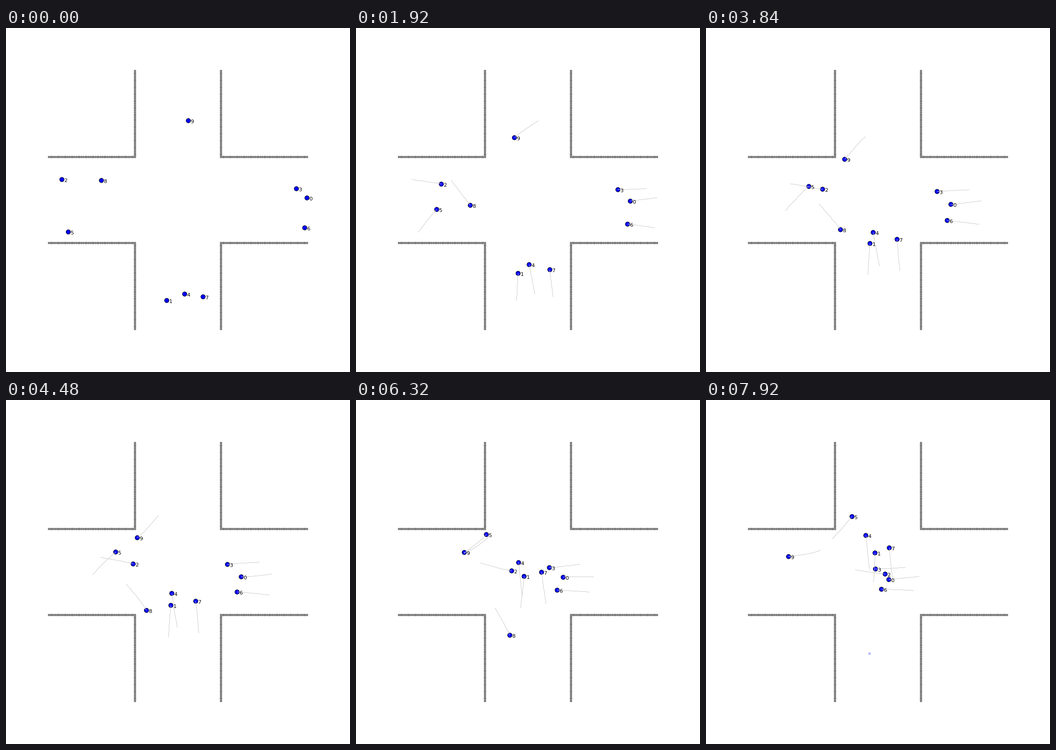
Write a matplotlib script that moves like this. It is 748 by 748 pixels and loops after 8 s.

```python
import numpy as np
import matplotlib.pyplot as plt
from matplotlib.animation import FuncAnimation
from matplotlib.collections import PolyCollection

SIZE, DPI = 748, 100
PX = 72 / DPI                # one pixel in points
FRAMES, INTERVAL = 100, 80
TRAIL = 25                   # steps kept in a trail
UNIT = SIZE / 20             # pixels per world unit
GOAL = np.array([355, 551])
FINISHER = 8                 # the walker that reaches its goal

# Each walker's route: its start, three points on the way and its end, evenly timed.
ROUTES = [
    [(654, 369), (593.5, 376.5), (527, 384), (461, 384.5), (394.5, 390.5)],
    [(349.5, 592), (352.5, 531), (357, 463), (364.5, 394), (368, 330)],
    [(121.5, 329.5), (188.5, 339.5), (259.5, 352), (327.5, 369.5), (392, 379)],
    [(631.5, 349.5), (567, 352), (497.5, 356), (431, 364), (365.5, 368)],
    [(388.5, 578), (376, 512), (363, 438.5), (355, 365.5), (347.5, 292)],
    [(135.5, 443.5), (177, 392), (227, 341), (276, 300), (319, 252)],
    [(649, 434), (588, 426), (519, 418.5), (449, 414), (379, 411)],
    [(428.5, 584), (421, 522.5), (414.5, 454), (405, 385.5), (398.5, 319)],
    [(207, 331.5), (250.5, 387.5), (296, 443), (330, 502.5), (357, 559.5)],
    [(396, 201.5), (342.5, 240), (297.5, 289), (246, 327.5), (177, 341.5)],
]


def glide(route):
    """Whole-pixel position per frame on a smooth curve through the route."""
    p = np.array(route, float)
    slope = np.gradient(p, axis=0)
    t = np.arange(FRAMES) / FRAMES * (len(p) - 1)
    i = t.astype(int)
    s = (t - i)[:, None]
    curve = ((1 + 2 * s) * (1 - s) ** 2 * p[i] + s * (1 - s) ** 2 * slope[i]
             + s ** 2 * (3 - 2 * s) * p[i + 1] - s ** 2 * (1 - s) * slope[i + 1])
    return np.floor(curve)


paths = [glide(route) for route in ROUTES]
arrival = np.argmax(np.hypot(*(paths[FINISHER] - GOAL).T) < 3)

fig = plt.figure(figsize=(SIZE / DPI, SIZE / DPI), dpi=DPI, facecolor="white")
ax = fig.add_axes([0, 0, 1, 1])
ax.set_xlim(-0.5, SIZE - 0.5)
ax.set_ylim(SIZE - 0.5, -0.5)
ax.axis("off")


def draw_walls():
    steps = np.arange(51) * 0.1
    centres = []
    for edge in (7.5, 12.5):
        for start in (2.5, 12.5):
            for step in steps:
                centres += [(start + step, edge), (edge, start + step)]
    centres = np.floor(np.array(centres) * UNIT + 1e-6)
    diamond = 2.5 * np.array([(1, 0), (0, 1), (-1, 0), (0, -1)])
    walls = PolyCollection(centres[:, None] + diamond, facecolor="#808080",
                           linewidth=0, antialiased=False, zorder=1)
    walls.set_snap(False)
    ax.add_collection(walls)


draw_walls()
dots, trails, labels = [], [], []
for number in range(len(paths)):
    dots.append(ax.add_patch(plt.Circle((0, 0), 4.8, facecolor="#0000ff",
                                        edgecolor="black", lw=0.9 * PX, zorder=2)))
    trails += ax.plot([], [], color="#c8c8c8", lw=0.9 * PX, zorder=3)
    labels.append(ax.text(0, 0, str(number), family="DejaVu Sans",
                          size=11 * PX, color="black", va="baseline", zorder=4))

gx, gy = GOAL
goal, = ax.plot([gx - 2, gx + 2, np.nan, gx - 2, gx + 2],
                [gy - 2, gy + 2, np.nan, gy + 2, gy - 2],
                color="#7878ff", lw=1 * PX, zorder=2)


def update(frame):
    for number, path in enumerate(paths):
        x, y = path[frame]
        dots[number].center = x, y
        trails[number].set_data(*path[max(0, frame - TRAIL):frame + 1].T)
        labels[number].set_position((x + 5, y + 5.5))
    arrived = bool(frame >= arrival)
    for part in (dots[FINISHER], trails[FINISHER], labels[FINISHER]):
        part.set_visible(not arrived)
    goal.set_visible(arrived)
    return [*dots, *trails, *labels, goal]


anim = FuncAnimation(fig, update, frames=FRAMES, interval=INTERVAL,
                     repeat=True, repeat_delay=0, blit=False)
plt.show()
```
